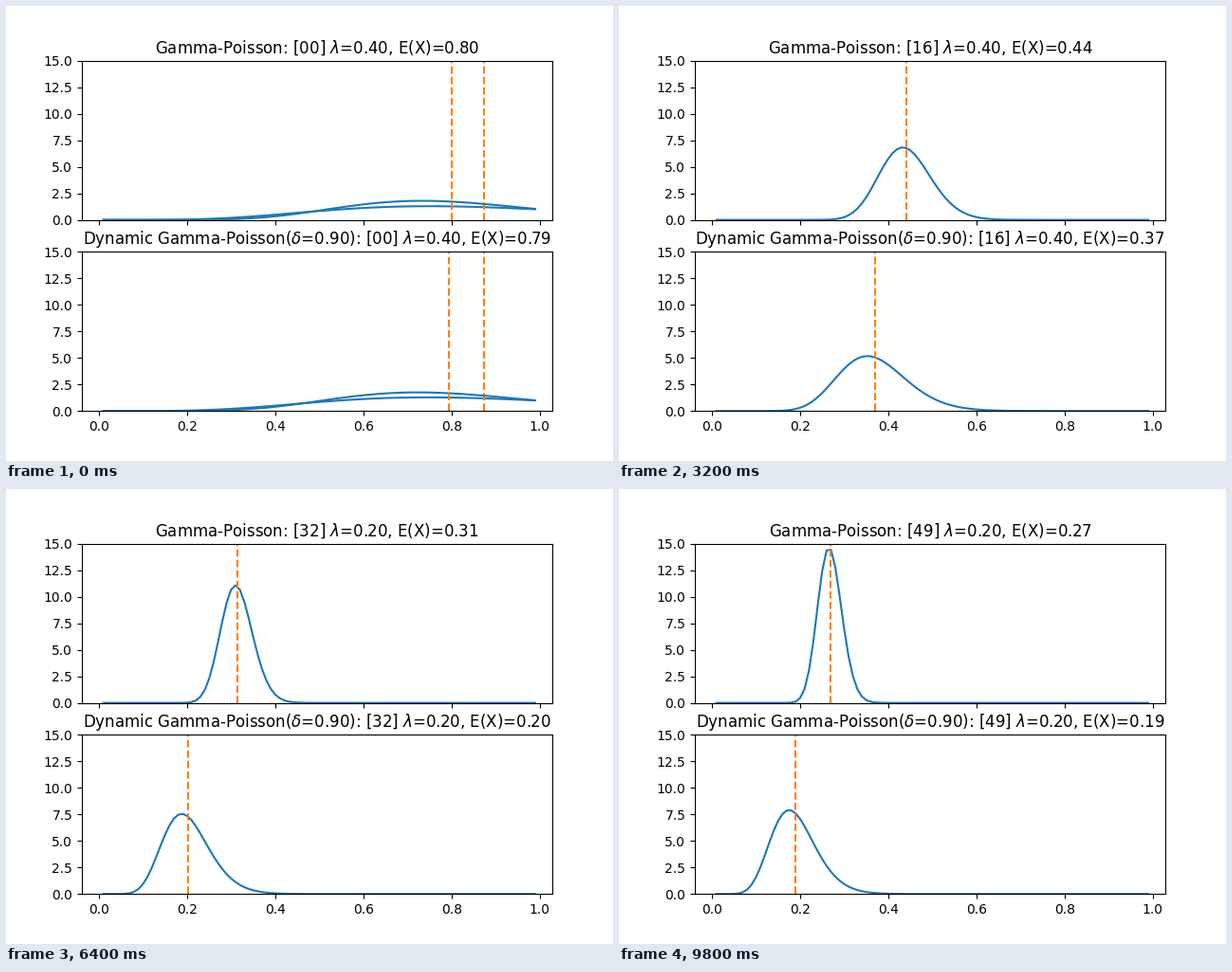
Recreate the animation shown at these times as a matplotlib script. Size 640 px wide and 480 px high, loop 10 s.

```python
import math

import matplotlib.pyplot as plt
import numpy as np
from matplotlib.animation import FuncAnimation

FRAMES = 50
DAYS = 7          # observations per update
DELTA = 0.9       # discount factor of the dynamic model
SWITCH = 20       # the rate drops here

# Weekly event totals; two of them are used up by the opening picture.
COUNTS = [6, 5, 4, 4, 3, 3, 4, 3, 3, 4, 2, 2, 1, 2, 3, 2, 3,
          1, 2, 0, 4, 0, 1, 0, 0, 0, 1, 3, 1, 2, 2, 2, 1, 0,
          0, 1, 2, 1, 1, 0, 2, 1, 2, 1, 1, 2, 2, 1, 2, 1, 1]

x = np.arange(0.01, 1.0, 0.01)


def gamma_pdf(a, b):
    return np.exp(a * math.log(b) - math.lgamma(a) + (a - 1) * np.log(x) - b * x)


def posteriors(discount):
    a = b = 1.0
    out = []
    for n in COUNTS:
        a = discount * a + n
        b = discount * b + DAYS
        out.append((a, b))
    return out


class Panel:
    def __init__(self, ax, name, discount):
        self.ax, self.name = ax, name
        self.steps = posteriors(discount)
        self.pairs = []
        for _ in range(2):
            curve, = ax.plot(x, np.zeros_like(x), color="C0")
            mean = ax.axvline(0.5, color="C1", linestyle="--")
            self.pairs.append((curve, mean))
        ax.set_xlim(-0.039, 1.029)
        ax.set_ylim(0, 15)

    def show(self, pair, step):
        a, b = self.steps[step]
        curve, mean = pair
        curve.set_ydata(gamma_pdf(a, b))
        mean.set_xdata([a / b, a / b])
        return a / b

    def draw(self, i):
        first, current = self.pairs
        self.show(first, 0)
        for artist in first:
            artist.set_visible(i == 0)
        expected = self.show(current, i + 1)
        rate = 0.4 if i < SWITCH else 0.2
        self.ax.set_title(
            rf"{self.name}: [{i:02d}] $\lambda$={rate:.2f}, E(X)={expected:.2f}")


fig, (top, bottom) = plt.subplots(2, 1, sharex=True, figsize=(6.4, 4.8), dpi=100)
panels = [
    Panel(top, "Gamma-Poisson", 1.0),
    Panel(bottom, rf"Dynamic Gamma-Poisson($\delta$={DELTA:.2f})", DELTA),
]


def update(i):
    for panel in panels:
        panel.draw(i)
    return []


def reset():
    return update(0)


anim = FuncAnimation(fig, update, frames=FRAMES, init_func=reset,
                     interval=200, repeat=True, repeat_delay=0, blit=False)
plt.show()
```
